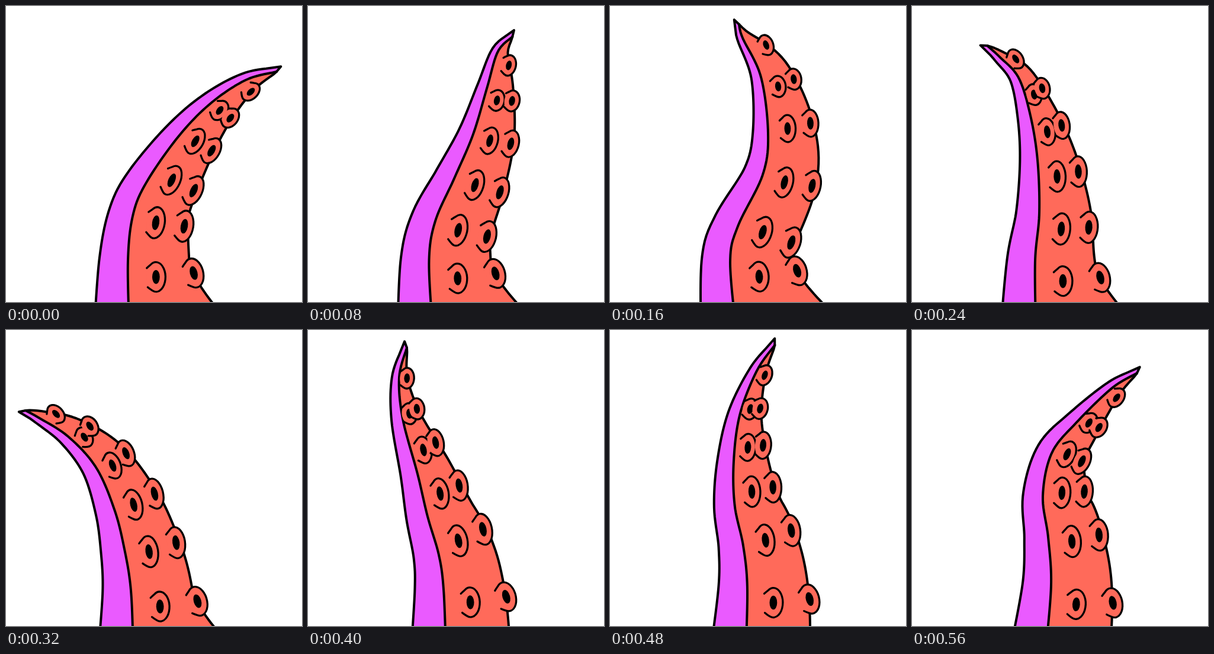
An HTML page with a canvas for the animation above (0.64 s loop, 500x500 px).

```html
<!DOCTYPE html>
<html lang="en">
<head>
<meta charset="utf-8">
<title>Waving tentacle</title>
<style>
  html, body { margin: 0; width: 100%; height: 100%; overflow: hidden; background: #fff; }
  canvas { display: block; width: 100%; height: 100%; }
</style>
</head>
<body>
<canvas id="stage" width="500" height="500"></canvas>
<script>
const ctx = document.getElementById('stage').getContext('2d');
const PURPLE = '#ea5aff', RED = '#ff6a5a', INK = '#000';
const STEP = 80, SAMPLES = 80;
const PIVOT = [240, 560];
const { PI, sin, cos, hypot, atan2, max, floor } = Math;

// seam: key points of the line between the two colours, base to tip
// flare: extra width at the base, plump: extra width towards the tip
const right = {
  seam: [[208,540], [206,430], [214,355], [236,300], [290,222], [345,165], [405,125], [457,111]],
  flare: 60, plump: 3
};
const upright = {
  seam: [[212,540], [203,430], [216,372], [258,285], [267,215], [255,120], [224,54], [218,31]],
  flare: 60, plump: 18
};
const leaning = {
  seam: [[209,540], [208,430], [215,350], [212,260], [200,185], [180,121], [148,86], [127,67]],
  flare: 60, plump: -8
};
const left = {
  seam: [[215,540], [211,440], [200,370], [183,303], [152,232], [105,180], [55,148], [33,136]],
  flare: 60, plump: 0
};
const rising = {
  seam: [[233,540], [229,438], [221,380], [202,315], [185,243], [160,150], [154,80], [167,30]],
  flare: 0, plump: -13
};
const returning = {
  seam: [[226,540], [235,430], [230,350], [221,280], [236,208], [278,156], [338,98], [380,73]],
  flare: 0, plump: -5
};

const mean = (a, b) => (a + b) / 2;

// Halfway point along an arc around the base; lift stretches the far end
function swing(p, q, lift) {
  const polar = ([x, y]) => {
    const dx = x - PIVOT[0], dy = PIVOT[1] - y;
    return [atan2(dx, dy), hypot(dx, dy)];
  };
  const [a, r] = polar(p), [b, s] = polar(q);
  const turn = mean(a, b), base = mean(r, s);
  const reach = base * (1 + lift * (base / 530) ** 3);
  return [PIVOT[0] + sin(turn) * reach, PIVOT[1] - cos(turn) * reach];
}

const between = (a, b, lift) => ({
  seam: a.seam.map((p, i) => swing(p, b.seam[i], lift)),
  flare: mean(a.flare, b.flare),
  plump: mean(a.plump, b.plump)
});

const backWidth = s => 7 + 52 * (1 - s);
const redWidth = (s, { flare, plump }) =>
  108 * max(0, cos(s * PI / 2)) ** 0.87
  + plump * sin(PI * s * s)
  + flare * max(0, 1 - s / 0.2) ** 1.5;

// Dense Catmull-Rom curve through the key points
function smooth(keys) {
  const out = [keys[0]];
  for (let i = 0; i < keys.length - 1; i++) {
    const b = keys[i], c = keys[i + 1], a = keys[i - 1] || b, d = keys[i + 2] || c;
    for (let k = 1; k <= 24; k++) {
      const t = k / 24;
      out.push([0, 1].map(j => b[j] + t / 2 * (c[j] - a[j]
        + t * (2 * a[j] - 5 * b[j] + 4 * c[j] - d[j]
        + t * (3 * b[j] - a[j] - 3 * c[j] + d[j])))));
    }
  }
  return out;
}

// Returns s in 0..1 -> point on the seam, by length
function ruler(keys) {
  const pts = smooth(keys), len = [0];
  for (let i = 1; i < pts.length; i++)
    len.push(len[i - 1] + hypot(pts[i][0] - pts[i - 1][0], pts[i][1] - pts[i - 1][1]));
  return s => {
    const goal = s * len[len.length - 1];
    const i = max(1, len.findIndex(l => l >= goal - 1e-6));
    const t = (goal - len[i - 1]) / (len[i] - len[i - 1]);
    return [0, 1].map(j => pts[i - 1][j] + t * (pts[i][j] - pts[i - 1][j]));
  };
}

// Suckers in pairs up the arm, with a single one near the tip
function placeCups(place, heading, width) {
  const cups = [];
  const add = (i, s, across, lean) => cups.push({
    at: place(s, across * width(s)),
    rx: 16 - 0.8 * i,
    ry: max(17.5, 25 + 2.6 * i - 1.1 * i * i),
    tilt: 0.72 * heading(s) + lean
  });
  for (let i = 0; i < 6; i++) {
    const s = 0.15 + 0.195 * i - 0.0095 * i * i;
    if (i < 5) add(i, s, 0.42, 0);
    add(i, s + 0.012, i ? 0.93 : 1.01, i ? 0 : -0.25);
  }
  return cups;
}

function build(pose) {
  const point = ruler(pose.seam);
  const heading = s => {
    const a = point(max(0, s - 0.015)), b = point(Math.min(1, s + 0.015));
    return atan2(b[0] - a[0], a[1] - b[1]);
  };
  // Point beside the seam: positive across is the red side
  const place = (s, across, along = 0) => {
    const [x, y] = point(s), h = heading(s);
    return [x + cos(h) * across + sin(h) * along, y + sin(h) * across - cos(h) * along];
  };
  const width = s => redWidth(s, pose);
  const line = (side, end = 1) => Array.from({ length: SAMPLES + 1 }, (_, i) => {
    const s = i / SAMPLES * end;
    return place(s, side(s));
  });
  return {
    back: [...line(s => -backWidth(s), 0.97), place(1, -7, 9), point(1)],
    seam: line(() => 0),
    edge: line(width).reverse(),
    cups: placeCups(place, heading, width)
  };
}

const poses = [
  right, between(right, upright, 0.01), upright, leaning,
  left, rising, between(rising, returning, 0.03), returning
].map(build);

function outline(pts) {
  const path = new Path2D();
  pts.forEach(p => path.lineTo(...p));
  return path;
}

function fill(path, color) {
  ctx.fillStyle = color;
  ctx.fill(path);
}

function drawCup({ at: [x, y], rx, ry, tilt }) {
  const rad = PI / 180;
  const at = (deg, k) => [cos(deg * rad) * rx * k, sin(deg * rad) * ry * k];
  const oval = (w, h) => {
    const path = new Path2D();
    path.ellipse(0, 0, rx * w, ry * h, 0, 0, 2 * PI);
    return path;
  };
  ctx.save();
  ctx.translate(x, y);
  ctx.rotate(tilt);
  fill(oval(1, 1), RED);
  const ring = new Path2D();
  ring.moveTo(...at(212, 1.14));
  ring.quadraticCurveTo(...at(222, 1.06), ...at(235, 1));
  ring.ellipse(0, 0, rx, ry, 0, -125 * rad, 112 * rad);
  ring.quadraticCurveTo(...at(128, 1.04), ...at(142, 1.12));
  ctx.lineWidth = 3.3;
  ctx.stroke(ring);
  fill(oval(0.4, 0.47), INK);
  ctx.restore();
}

function draw({ back, seam, edge, cups }) {
  ctx.fillStyle = '#fff';
  ctx.fillRect(0, 0, 500, 500);
  ctx.strokeStyle = INK;
  ctx.lineCap = ctx.lineJoin = 'round';
  fill(outline([...back, ...[...seam].reverse()]), PURPLE);
  fill(outline([...seam, ...edge]), RED);
  ctx.lineWidth = 4;
  [back, seam, edge].forEach(pts => ctx.stroke(outline(pts)));
  cups.forEach(drawCup);
}

const start = performance.now();
function tick() {
  const step = floor((performance.now() - start) / STEP);
  draw(poses[step % poses.length]);
  requestAnimationFrame(tick);
}
tick();
</script>
</body>
</html>
```
